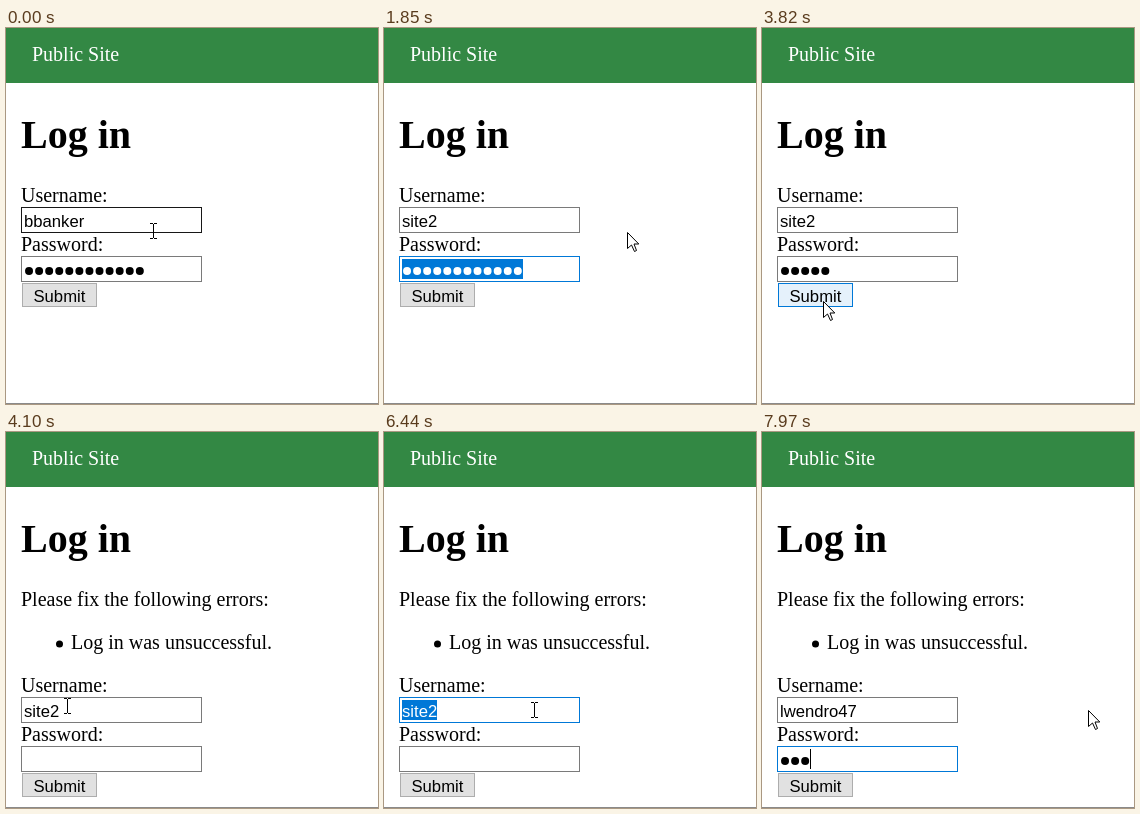
An HTML page with a canvas for the animation above (8 s loop, 372x376 px).

```html
<!DOCTYPE html>
<html lang="en">
<head>
<meta charset="utf-8">
<title>Log in</title>
<style>
  html, body { margin: 0; width: 100%; height: 100%; overflow: hidden; background: #fff; }
  canvas { display: block; width: 372px; height: 376px; }
</style>
</head>
<body>
<canvas id="stage" width="372" height="376"></canvas>
<script>
const ctx = document.getElementById('stage').getContext('2d');
const LOOP = 8000;
const SERIF = '"Liberation Serif", "Times New Roman", serif';
const SANS = '"Liberation Sans", Arial, sans-serif';
const BLUE = '#0078d7';
const DOT = 10.07;
const ERROR_SHIFT = 86;

const OLD_USER = 'bbanker';
const USER = 'site2';
const NEW_USER = 'lwendro47';

const start = {
  user: OLD_USER, dots: 12, focus: '', selected: false,
  hover: 'user', pressed: false, error: false,
  x: 147, y: 202, beam: true
};

const arrow = (x, y) => ({ x, y, beam: false, hover: '' });
const beam = (x, y, hover = '') => ({ x, y, beam: true, hover });

// Each entry changes part of the state at its time.
const steps = [
  [440, { focus: 'user' }],
  [577, { selected: true }],
  [714, arrow(205, 203)],
  [851, arrow(243, 204)],
  [989, { user: USER.slice(0, 1), selected: false }],
  [1126, { user: USER.slice(0, 2) }],
  [1263, { user: USER.slice(0, 3) }],
  [1400, { user: USER.slice(0, 4) }],
  [1540, { user: USER }],
  [1850, { focus: 'pass', selected: true }],

  [2280, { dots: 1, selected: false }],
  [2417, { dots: 2 }],
  [2553, { dots: 3 }],
  [2690, { dots: 4 }],
  [2990, { dots: 5 }],
  [3270, beam(160, 236, 'pass')],
  [3400, beam(98, 254)],
  [3545, { ...arrow(61, 273), hover: 'submit' }],
  [3682, { focus: '', pressed: true }],
  [3820, { pressed: false }],

  [4100, { error: true, dots: 0, ...beam(61, 273) }],
  [4250, { hover: 'user' }],
  [4520, beam(64, 257)],
  [4661, arrow(69, 229)],
  [4803, beam(73, 206)],
  [4944, arrow(75, 188)],
  [5080, arrow(76, 181)],
  [5230, arrow(222, 183)],
  [5370, arrow(336, 197)],
  [5510, arrow(218, 226)],
  [5640, arrow(206, 240)],
  [5773, arrow(188, 252)],
  [5906, beam(168, 270, 'user')],
  [6039, beam(154, 276, 'user')],
  [6171, beam(150, 277, 'user')],
  [6304, { focus: 'user' }],
  [6440, { selected: true }],
  [6570, arrow(218, 298)],

  [6720, { user: NEW_USER.slice(0, 2), selected: false }],
  [6857, { user: NEW_USER.slice(0, 4) }],
  [6995, { user: NEW_USER.slice(0, 6) }],
  [7132, { user: NEW_USER }],
  [7270, { focus: 'pass' }],
  [7550, { dots: 1 }],
  [7690, { dots: 2 }],
  [7830, arrow(290, 288)],
  [7970, { dots: 3, ...arrow(326, 278) }]
];

function stateAt(time) {
  const state = { ...start };
  for (const [at, change] of steps) {
    if (at > time) break;
    Object.assign(state, change);
  }
  return state;
}

function rect(x, y, w, h, color) {
  ctx.fillStyle = color;
  ctx.fillRect(x, y, w, h);
}

function text(str, x, y, font, color = '#000') {
  ctx.font = font;
  ctx.fillStyle = color;
  ctx.fillText(str, x, y);
}

function circle(x, y, r, color) {
  ctx.fillStyle = color;
  ctx.beginPath();
  ctx.arc(x, y, r, 0, Math.PI * 2);
  ctx.fill();
}

function box(x, y, w, h, fill, edge) {
  rect(x, y, w, h, edge);
  rect(x + 1, y + 1, w - 2, h - 2, fill);
}

const body = (str, x, y, color) => text(str, x, y, '20px ' + SERIF, color);
const control = (str, x, y, color) => text(str, x, y, '16.67px ' + SANS, color);

function field(name, y, s) {
  const focused = s.focus === name;
  const edge = focused ? BLUE : s.hover === name ? '#171717' : '#7a7a7a';
  box(15, y, 181, 26, '#fff', edge);

  ctx.font = '16.67px ' + SANS;
  const width = name === 'user' ? ctx.measureText(s.user).width : s.dots * DOT;
  const marked = focused && s.selected;
  const color = marked ? '#fff' : '#000';
  if (marked) rect(18, y + 3, Math.round(width), 20, BLUE);

  if (name === 'user') {
    control(s.user, 18, y + 20, color);
  } else {
    for (let i = 0; i < s.dots; i++) circle(18 + DOT * (i + 0.5), y + 15, 4, color);
  }
  if (focused && !marked) rect(Math.round(18 + width), y + 3, 1, 20, '#000');
}

function button(y, s) {
  let fill = '#e1e1e1', edge = '#adadad';
  if (s.hover === 'submit') [fill, edge] = ['#e5f1fb', BLUE];
  if (s.pressed) [fill, edge] = ['#cce4f7', '#005499'];
  box(16, y, 75, 24, fill, edge);
  control('Submit', 27.5, y + 19);
}

function pointer({ x, y, beam }) {
  if (beam) {
    rect(x, y - 6, 1, 14, '#000');
    for (const end of [y - 7, y + 8]) {
      rect(x - 3, end, 3, 1, '#000');
      rect(x + 1, end, 3, 1, '#000');
    }
    return;
  }
  const shape = [[0, 0], [0, 16], [4, 12.5], [7, 19], [9, 18], [6.5, 11.5], [11.3, 11.5]];
  ctx.beginPath();
  for (const [dx, dy] of shape) ctx.lineTo(x + 0.5 + dx, y + 0.5 + dy);
  ctx.closePath();
  ctx.fillStyle = '#fff';
  ctx.fill();
  ctx.strokeStyle = '#000';
  ctx.lineWidth = 1;
  ctx.stroke();
}

function draw(s) {
  rect(0, 0, 372, 376, '#fff');
  rect(0, 0, 372, 55, '#338844');
  rect(0, 375, 372, 1, '#8a8a8a');
  body('Public Site', 26, 33, '#fff');
  text('Log in', 15, 120, 'bold 40px ' + SERIF);

  if (s.error) {
    body('Please fix the following errors:', 15, 174);
    circle(53.5, 212, 3.5, '#000');
    body('Log in was unsuccessful.', 65, 217);
  }

  const top = s.error ? ERROR_SHIFT : 0;
  body('Username:', 15, 174 + top);
  field('user', 179 + top, s);
  body('Password:', 15, 223 + top);
  field('pass', 228 + top, s);
  button(255 + top, s);
  pointer(s);
}

const begin = performance.now();
function tick() {
  draw(stateAt((performance.now() - begin) % LOOP));
  requestAnimationFrame(tick);
}
tick();
</script>
</body>
</html>
```
